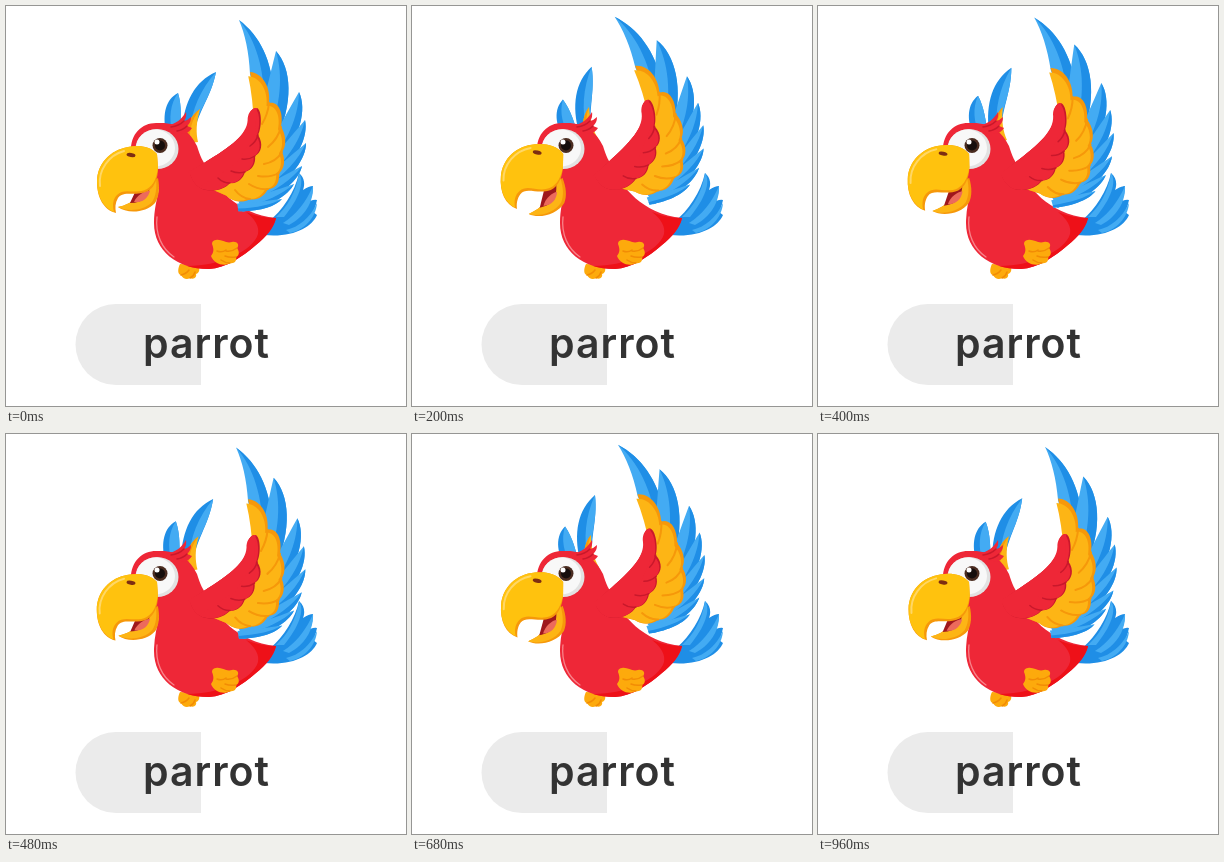
Animation, 400 px wide and 400 px high, one loop 1000 ms. Source, as an HTML page without scripts:

```html
<!DOCTYPE html>
<html lang="en">
<head>
<meta charset="utf-8">
<title>parrot</title>
<style>
  @property --flap { syntax: "<number>"; inherits: true; initial-value: 0; }

  html, body { margin: 0; width: 100%; height: 100%; overflow: hidden; background: #fff; }
  svg { display: block; width: 100%; height: 100%; animation: flap 1s infinite; }

  /* one wing-beat value drives every moving part */
  @keyframes flap {
    0%   { --flap: 0;   animation-timing-function: steps(2); }
    8%   { --flap: .3;  animation-timing-function: steps(1); }
    12%  { --flap: .55; animation-timing-function: steps(2); }
    20%  { --flap: .92; animation-timing-function: steps(2); }
    28%  { --flap: 1;   animation-timing-function: steps(2); }
    36%  { --flap: .72; animation-timing-function: steps(3); }
    48%  { --flap: .09; animation-timing-function: steps(1); }
    52%  { --flap: 0;   animation-timing-function: steps(2); }
    60%  { --flap: .38; animation-timing-function: steps(2); }
    68%  { --flap: .82; animation-timing-function: steps(2); }
    76%  { --flap: .97; animation-timing-function: steps(2); }
    84%  { --flap: .73; animation-timing-function: steps(3); }
    96%  { --flap: .18; animation-timing-function: steps(1); }
    100% { --flap: 0; }
  }
  .turn { transform: rotate(calc(var(--flap) * var(--by))); }
  .wing { --by: -11.6deg; transform-origin: 200px 175px; }
  .far  { --by: -21.4deg; transform-origin: 180px 151px; }
  .beak { --by: 5.7deg;   transform-origin: 152px 150px; }
  .jaw  { --by: -12deg;   transform-origin: 150px 180px; }

  .red { fill: #ee2737; }
  .crimson { fill: #c9182b; }
  .yellow { fill: #fdb515; }
  .gold { fill: #ffc20e; }
  .orange { fill: #f6980a; }
  .blue { fill: #1f8ee6; }
  .sky { fill: #43abf3; }
  .line { fill: none; stroke-linecap: round; }
  text { font: 600 41px Inter, "Open Sans", sans-serif; letter-spacing: 1px; fill: #333; text-anchor: middle; }
</style>
</head>
<body>
<svg viewBox="0 0 400 400">
  <defs>
    <g id="feather">
      <path class="sky" d="M0 0C20 16 29 54 15 100H-11C-4 62-3 32 0 0Z"/>
      <path class="blue" d="M0 0C20 16 29 54 15 100H6C15 56 12 26 0 0Z"/>
    </g>
    <path id="coverts" d="M244 66C257 67 265 82 263 97C272 95 278 106 275 121C280 128 281 140 276 146C280 154 278 164 273 167C274 176 270 183 262 183C258 191 250 195 244 193C236 198 226 195 221 190L198 180L225 165L250 120Q249 88 244 66Z"/>
    <path id="shoulder" d="M251 102C246 101 243 107 243 113C242 128 226 140 198 157L184 166C186 177 193 183 200 184C209 186 219 183 224 177C231 178 237 173 239 166C246 164 250 158 249 150C255 147 258 138 252 129C256 122 256 104 251 102Z"/>
  </defs>

  <path fill="#ebebeb" d="M195 298H110A40 40 0 0 0 110 379H195Z"/>
  <text x="200.500" y="351.500">parrot</text>

  <g class="turn far">
    <path class="blue" d="M172 87C160 93 156 108 160 126L174 132C175 114 176 100 172 87Z"/>
    <path class="sky" d="M172 87C164 98 163 112 166 126L174 128C175 112 176 100 172 87Z"/>
    <path class="blue" d="M210 66C189 75 178 96 176 124L188 130C190 108 205 92 210 66Z"/>
    <path class="sky" d="M210 66C194 84 186 104 184 124L189 122C191 106 205 92 210 66Z"/>
    <path class="yellow" d="M178 138C179 120 185 109 194 103C190 117 190 127 192 136Z"/>
    <path class="orange" d="M178 138C179 120 185 109 194 103C185 114 183 126 184 138Z"/>
  </g>

  <!-- tail -->
  <path class="blue" d="M262 216C276 205 289 186 293 167C299 172 299 179 297 184Q303 180 307 180Q307 188 304 195Q309 193 311 194Q310 200 307 206L311 209C306 221 287 232 258 229Z"/>
  <g class="sky">
    <path d="M270 211C281 201 290 187 293 167C299 176 293 193 278 211Z"/>
    <path d="M277 217C290 209 300 196 307 180C308 197 297 212 283 219Z"/>
    <path d="M280 224C293 221 304 212 311 197C310 212 298 224 284 227Z"/>
  </g>

  <!-- body -->
  <path fill="#fdaa0c" d="M174 258C172 262 171 268 175 269C177 273 181 274 184 272C188 274 191 271 190 268C194 267 194 262 192 259Z"/>
  <path class="line" stroke="#f28c05" stroke-width="1.5" d="M175 269Q180 268 183 264M184 272Q188 270 189 266"/>
  <path class="red" d="M125 146C124 127 137 116 152 117C172 116 184 125 191 140C194 150 197 156 201 161C209 180 230 208 270 212C268 222 260 231 250 239C236 251 220 262 203 263C171 263 148 245 148 217C148 204 151 193 153 182Z"/>
  <path fill="#ee1018" d="M240 206Q254 212 270 212C268 222 260 231 250 239C236 251 220 262 203 263Q190 263 181 260C214 260 247 245 252 228Q254 217 240 206Z"/>
  <path class="line" stroke="#f8828a" stroke-width="1.3" d="M151 211C149 228 156 243 168 251"/>
  <path fill="#fdaa0c" d="M210 234C216 233 220 238 226 236C231 235 234 239 231 242C234 246 233 250 230 251C231 255 228 258 224 257C218 261 208 258 205 250C208 246 208 243 206 238C206 235 208 234 210 234Z"/>
  <path class="line" stroke="#f28c05" stroke-width="1.5" d="M211 245Q216 247 220 244M231 242Q226 246 220 245M230 251Q224 252 219 250M224 257Q219 257 215 254"/>

  <!-- head -->
  <path class="red" d="M160 120C170 118 176 113 180 106Q181 111 178 115Q182 114 185 111Q185 117 181 120L186 122Q183 127 177 128Z"/>
  <path class="line" stroke="#c9182b" stroke-width="1.5" d="M165 121Q173 120 178 115M171 125Q177 124 181 120"/>
  <ellipse cx="151" cy="143" rx="21.500" ry="20" fill="#e2e2e2"/>
  <ellipse cx="149.500" cy="142" rx="19.500" ry="18.500" fill="#f8f8f8"/>
  <circle cx="154" cy="139.500" r="7.500" fill="#4a2c20"/>
  <circle cx="154" cy="139.500" r="5" fill="#160e0c"/>
  <circle cx="151" cy="136" r="2.500" fill="#fff"/>

  <g class="turn jaw">
    <path class="orange" d="M112 201C121 208 140 207 149 197C153 191 154 182 152 172L138 180C136 190 126 198 112 201Z"/>
    <path class="yellow" d="M112 201C121 206 138 205 146 196C150 190 151 182 150 172L138 180C136 190 126 198 112 201Z"/>
    <path fill="#9f171d" d="M124 197C138 197 144 189 145 174L131 182Z"/>
    <path fill="#ec6a5c" d="M128 196C131 189 140 184 144 185C142 192 137 197 128 196Z"/>
  </g>
  <g class="turn beak">
    <path class="orange" d="M151 148C144 140 132 139 122 141C104 144 91 158 91 176C91 192 98 204 110 207C109 202 109 197 112 192C117 184 130 191 142 185C149 181 152 172 152 162Z"/>
    <path class="gold" d="M151 148C144 140 132 139 122 141C104 144 91 158 91 176C91 191 98 202 108 206C106 199 107 193 111 189C118 181 130 189 141 183C148 179 151 171 152 161Z"/>
    <path class="line" stroke="#ffd766" stroke-width="2" d="M94 180C92 164 103 149 118 145"/>
    <ellipse cx="125" cy="149" rx="4.500" ry="2" fill="#7d2d12" transform="rotate(8 125 149)"/>
  </g>

  <g class="turn wing">
    <path class="sky" d="M233 14C239 28 243 46 244 68L254 110L268 90C266 54 254 30 233 14Z"/>
    <path class="blue" d="M233 14C254 30 266 54 268 90L258 100C259 64 250 34 233 14Z"/>
    <use href="#feather" transform="translate(270 45) rotate(9) scale(.9)"/>
    <use href="#feather" transform="translate(293 86) rotate(25) scale(.72 .75)"/>
    <use href="#feather" transform="translate(299 114) rotate(36) scale(.62 .68)"/>
    <use href="#feather" transform="translate(300 137) rotate(46) scale(.55 .64)"/>
    <use href="#feather" transform="translate(296 160) rotate(58) scale(.5 .6)"/>
    <use href="#feather" transform="translate(288 178) rotate(68) scale(.42 .58)"/>
    <use href="#feather" transform="translate(276 193) rotate(80) scale(.3 .45)"/>
    <use href="#coverts" class="orange"/>
    <use href="#coverts" class="yellow" transform="translate(8 7) scale(.96)"/>
    <path class="line" stroke="#f6980a" stroke-width="2" d="M263 97Q262 108 256 118M275 121Q272 133 262 141M276 146Q270 156 258 158M273 167Q264 172 252 170M262 183Q252 184 243 178M244 193Q235 192 229 184"/>
    <use href="#shoulder" class="crimson"/>
    <use href="#shoulder" class="red" transform="translate(3.500 3.500) scale(.98)"/>
    <path class="red" d="M251 102C246 101 243 107 243 113C242 128 226 140 198 157L182 166L194 181L230 158L249 128Z"/>
    <path class="line" stroke="#c9182b" stroke-width="1.500" d="M252 129Q250 136 244 140M249 150Q243 154 236 153M239 166Q232 168 225 165M224 177Q217 177 212 172"/>
  </g>
</svg>
</body>
</html>
```
